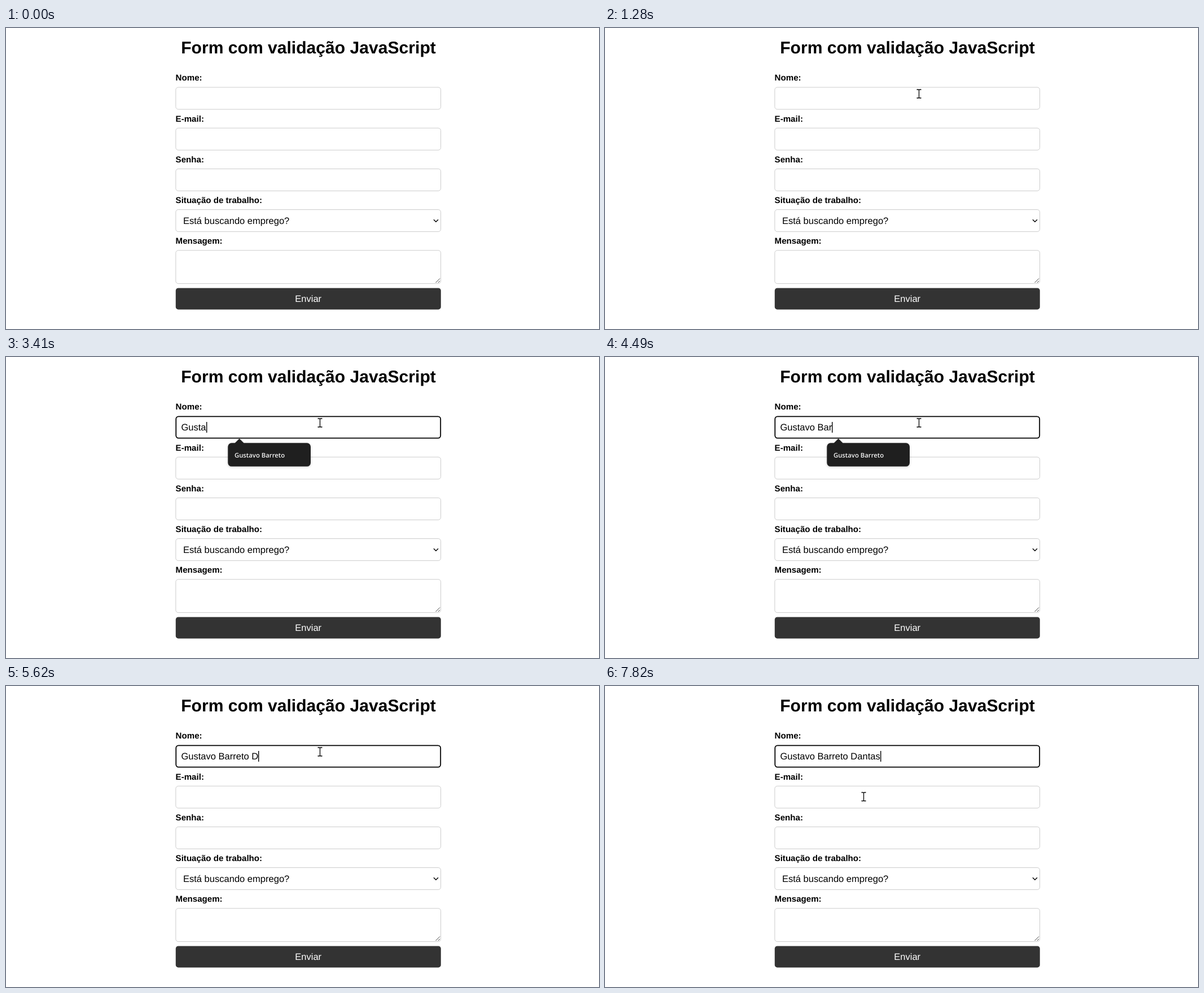
An HTML page with a canvas for the animation above (8000 ms loop, 1051x533 px).

```html
<!DOCTYPE html>
<html lang="pt-BR">
<head>
<meta charset="utf-8">
<title>Form com validação JavaScript</title>
<style>
  html, body { margin: 0; width: 100%; height: 100%; overflow: hidden; background: #fff; }
  canvas { display: block; }
</style>
</head>
<body>
<canvas id="stage" width="1051" height="533"></canvas>
<script>
const ctx = document.getElementById('stage').getContext('2d');
const LOOP = 8000;
const SANS = '"Liberation Sans", Arial, sans-serif';
const INPUT = '16.55px ' + SANS;
const LABEL = 'bold 15.1px ' + SANS;
const LEFT = 300.9, WIDTH = 469.7, ROW = 72.2;

const LABELS = ['Nome:', 'E-mail:', 'Senha:', 'Situação de trabalho:', 'Mensagem:'];
const NAME = 'Gustavo Barreto Dantas';
const HINT = 'Gustavo Barreto';
const FOCUS = 1490, HINT_END = 5020;

// Typing bursts: start, letters, time per letter
const KEYS = [[2820, 1, 0], [3020, 7, 110], [4140, 3, 175], [4690, 4, 107],
  [5290, 2, 330], [5760, 4, 130], [6420, 1, 0]]
  .flatMap(([start, count, step]) => Array.from({ length: count }, (_, i) => start + i * step));

// Pointer paths: start, end, Bézier points
const MOVES = [
  [180, 670, [[973, 514], [900, 240], [780, 119.5]]],
  [900, 1280, [[780, 119.5], [660, 71], [556.5, 116.5]]],
  [6760, 7620, [[556.5, 116.5], [660, 110], [590, 281], [467, 181]]],
  [7640, 7820, [[467, 181], [458.5, 196]]]
];

const clamp = v => Math.max(0, Math.min(1, v));

function bezier(pts, u) {
  if (pts.length === 1) return pts[0];
  return bezier(pts.slice(1).map((p, i) => p.map((v, k) => pts[i][k] + (v - pts[i][k]) * u)), u);
}

function pointerAt(t) {
  const move = MOVES.filter(([start]) => t >= start).pop();
  if (!move) return null;
  const [start, end, pts] = move;
  return bezier(pts, clamp((t - start) / (end - start)));
}

function text(str, x, y, font, color = '#000', align = 'left') {
  ctx.font = font;
  ctx.fillStyle = color;
  ctx.textAlign = align;
  ctx.fillText(str, x, y);
}

function box(x, y, w, h, r) {
  ctx.beginPath();
  ctx.roundRect(x, y, w, h, r);
}

function lines(color, width, ...paths) {
  ctx.strokeStyle = color;
  ctx.lineWidth = width;
  ctx.beginPath();
  for (const p of paths) p.forEach(([x, y], i) => i ? ctx.lineTo(x, y) : ctx.moveTo(x, y));
  ctx.stroke();
}

function drawField(label, row, focused) {
  const inset = focused ? 0.4 : 0;
  const height = row === 4 ? 58.8 : 39;
  text(label, 300.6, 93.4 + row * ROW, LABEL);
  box(LEFT + inset, 105 + row * ROW + inset, WIDTH - 2 * inset, height - 2 * inset, 4.5);
  ctx.strokeStyle = focused ? '#000' : '#ccc';
  ctx.lineWidth = focused ? 1.8 : 1;
  ctx.stroke();
}

function drawForm(t) {
  text('Form com validação JavaScript', 536, 45.3, 'bold 30.1px ' + SANS, '#000', 'center');
  LABELS.forEach((label, row) => drawField(label, row, row === 0 && t >= FOCUS));
  text('Está buscando emprego?', 313.9, 346.9, INPUT);
  lines('#000', 1.4, [[758, 339.3], [762, 343.3], [766, 339.3]]);
  lines('#444', 1, [[761.5, 451], [769, 443.5]], [[766, 451], [769, 448]]);
  box(300.8, 460.4, 470, 38, 4.5);
  ctx.fillStyle = '#333';
  ctx.fill();
  text('Enviar', 535.7, 485, INPUT, '#fff', 'center');
}

function drawTyped(t) {
  if (t < FOCUS) return;
  const pressed = KEYS.filter(k => t >= k);
  const typed = NAME.slice(0, pressed.length);
  text(typed, 310.4, 130, INPUT);
  const idle = t - Math.max(FOCUS + 60, ...pressed);
  if (idle % 1010 > 510) return;
  ctx.fillStyle = '#000';
  ctx.fillRect(Math.floor(311 + ctx.measureText(typed).width), 115, 1.4, 19);
}

function drawHint(t) {
  const alpha = Math.min(clamp((t - FOCUS) / 120), clamp(1 - (t - HINT_END) / 200));
  if (!alpha) return;
  const scale = 0.95 + 0.05 * alpha;
  ctx.save();
  ctx.translate(467, 173);
  ctx.scale(scale, scale);
  ctx.translate(-467, -173);
  ctx.globalAlpha = alpha;
  ctx.shadowColor = 'rgba(0,0,0,.2)';
  ctx.shadowBlur = 4;
  ctx.shadowOffsetY = 1;
  ctx.fillStyle = '#1f1f1f';
  box(393.3, 152.3, t < KEYS[0] ? 148 : 146.7, 41.5, 6.5);
  ctx.moveTo(405.5, 152.5);
  ctx.lineTo(413.6, 144.6);
  ctx.lineTo(421.7, 152.5);
  ctx.fill();
  // Opaque letters keep the popup fading as one layer
  ctx.globalAlpha = 1;
  ctx.shadowColor = 'transparent';
  text(HINT, 405, 178, '600 11.3px "Open Sans", "Noto Sans", sans-serif', '#f4f4f4');
  ctx.restore();
}

function drawBeam() {
  const serif = s => [[-4, 7.5 * s], [-1, 7.5 * s], [0, 6.7 * s], [1, 7.5 * s], [4, 7.5 * s]];
  lines('#000', 1.3, serif(-1), serif(1), [[0, -6.7], [0, 6.7]]);
}

function drawArrow() {
  ctx.beginPath();
  [[0.5, 0.5], [0.5, 14.4], [3.6, 11.6], [5.7, 16.4], [8, 15.4], [6, 10.8], [10.3, 10.5]]
    .forEach(p => ctx.lineTo(...p));
  ctx.closePath();
  ctx.fillStyle = '#fff';
  ctx.fill();
  ctx.strokeStyle = '#000';
  ctx.lineWidth = 1;
  ctx.stroke();
}

function drawPointer(t) {
  const pos = pointerAt(t);
  if (!pos) return;
  const [x, y] = pos;
  const inField = x > LEFT && x < LEFT + WIDTH && y > 105 && y < 250 && (y - 105) % ROW < 39;
  ctx.save();
  ctx.translate(x, y);
  inField ? drawBeam() : drawArrow();
  ctx.restore();
}

function draw(t) {
  ctx.fillStyle = '#fff';
  ctx.fillRect(0, 0, 1051, 533);
  drawForm(t);
  drawTyped(t);
  drawHint(t);
  drawPointer(t);
}

ctx.textRendering = 'geometricPrecision';
const begin = performance.now();
function tick() {
  draw((performance.now() - begin) % LOOP);
  requestAnimationFrame(tick);
}
tick();
</script>
</body>
</html>
```
